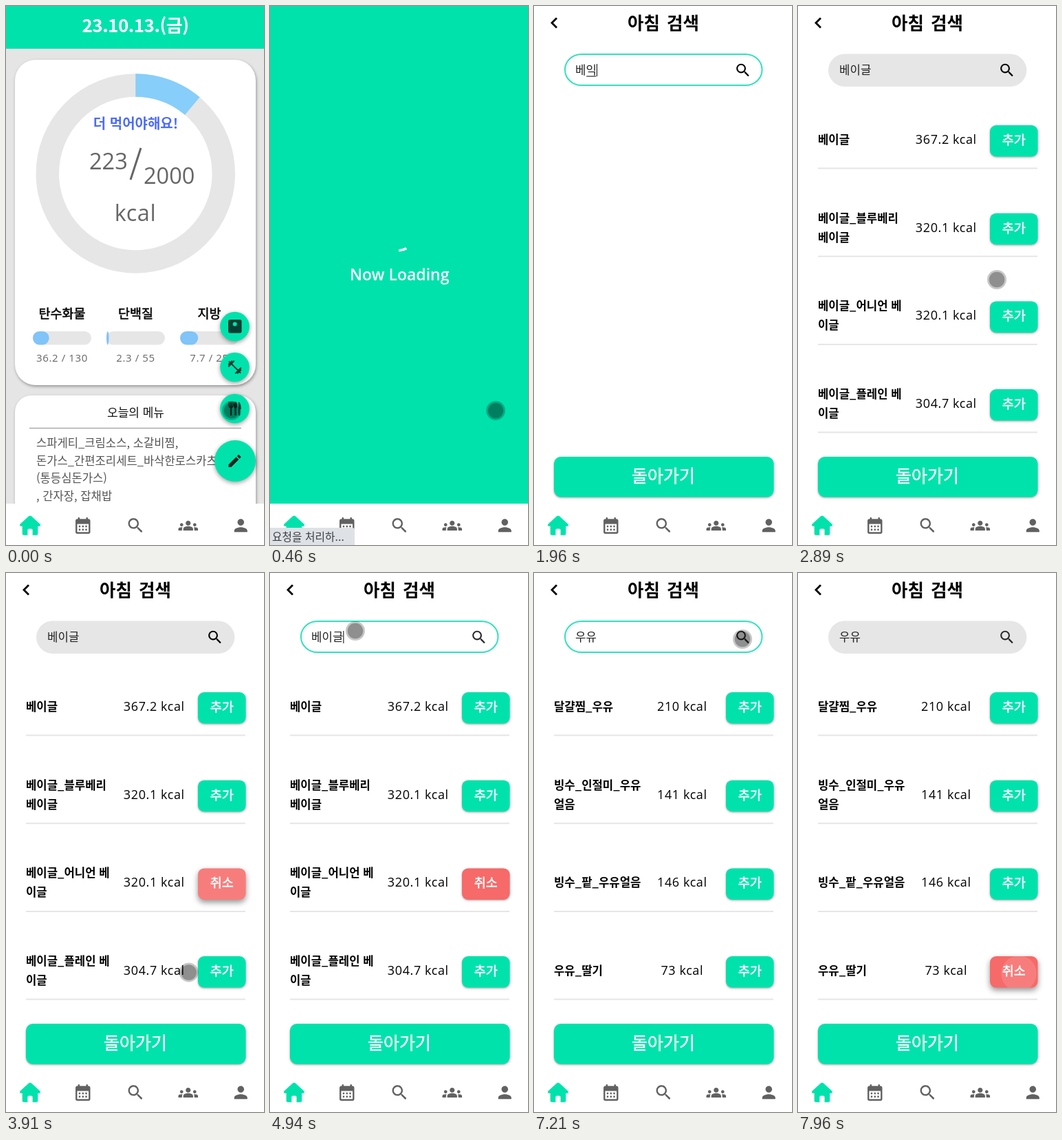
Animation, 375 px wide and 782 px high, one loop 8 s. Source, as an HTML page:

```html
<!DOCTYPE html>
<html lang="ko">
<head>
<meta charset="utf-8">
<title>Meal search</title>
<style>
  html, body { margin: 0; width: 100%; height: 100%; overflow: hidden; background: #fff; }
  svg { display: block; color: #000; }
  text { font-family: "Noto Sans CJK KR", "Noto Sans CJK", "Noto Sans", sans-serif; white-space: pre; }
  .latin { font-family: "Open Sans", "Noto Sans", sans-serif; }
  .mid { text-anchor: middle; }
  .green { fill: #00e2ac; }
  .grey { fill: #e6e6e6; }
  .blue { fill: #80c4f8; }
  .white { fill: #fff; color: #fff; }
  .soft { fill: #666; }
  .bold { font-weight: 700; }
  .semi { stroke: currentColor; stroke-width: .5px; }
  .card { fill: #fff; filter: drop-shadow(1px 2px 2px rgba(0,0,0,.35)); }
  .fab { fill: #00e2ac; filter: drop-shadow(0 2px 3px rgba(0,0,0,.38)); }
  .btn { filter: drop-shadow(0 1.5px 1px rgba(0,0,0,.24)) drop-shadow(0 1px 2px rgba(0,0,0,.14)); }
  .btn.down { filter: drop-shadow(0 4px 4px rgba(0,0,0,.42)); }
</style>
</head>
<body>
<svg id="stage" width="375" height="782" viewBox="0 0 375 782">
  <defs>
    <path id="search" d="M15.5 14h-.79l-.28-.27C15.41 12.59 16 11.11 16 9.5 16 5.91 13.09 3 9.5 3S3 5.91 3 9.5 5.91 16 9.5 16c1.61 0 3.09-.59 4.23-1.57l.27.28v.79l5 4.99L20.49 19l-4.99-5zm-6 0C7.01 14 5 11.99 5 9.5S7.01 5 9.5 5 14 7.01 14 9.5 11.99 14 9.5 14z"/>
    <path id="person" d="M12 12c2.21 0 4-1.79 4-4s-1.79-4-4-4-4 1.79-4 4 1.79 4 4 4zm0 2c-2.67 0-8 1.34-8 4v2h16v-2c0-2.66-5.33-4-8-4z"/>
    <path id="calendar" d="M19 4h-1V2h-2v2H8V2H6v2H5c-1.11 0-2 .9-2 2v14c0 1.1.89 2 2 2h14c1.1 0 2-.9 2-2V6c0-1.1-.9-2-2-2zm0 16H5V10h14v10zM9 14H7v-2h2v2zm4 0h-2v-2h2v2zm4 0h-2v-2h2v2zm-8 4H7v-2h2v2zm4 0h-2v-2h2v2zm4 0h-2v-2h2v2z"/>
    <path id="groups" d="M12 12.75c1.63 0 3.07.39 4.24.9 1.08.48 1.76 1.56 1.76 2.73V18H6v-1.61c0-1.18.68-2.26 1.76-2.73 1.17-.52 2.61-.91 4.24-.91zM4 13c1.1 0 2-.9 2-2s-.9-2-2-2-2 .9-2 2 .9 2 2 2zm1.13 1.1c-.37-.06-.74-.1-1.13-.1-.99 0-1.93.21-2.78.58C.48 14.9 0 15.62 0 16.43V18h4.5v-1.61c0-.83.23-1.61.63-2.29zM20 13c1.1 0 2-.9 2-2s-.9-2-2-2-2 .9-2 2 .9 2 2 2zm4 3.43c0-.81-.48-1.53-1.22-1.85-.85-.37-1.79-.58-2.78-.58-.39 0-.76.04-1.13.1.4.68.63 1.46.63 2.29V18H24v-1.57zM12 6c1.66 0 3 1.34 3 3s-1.34 3-3 3-3-1.34-3-3 1.34-3 3-3z"/>
    <path id="dumbbell" d="M20.57 14.86L22 13.43 20.57 12 17 15.57 8.43 7 12 3.43 10.57 2 9.14 3.43 7.71 2 5.57 4.14 4.14 2.71 2.71 4.14l1.43 1.43L2 7.71l1.43 1.43L2 10.57 3.43 12 7 8.43 15.57 17 12 20.57 13.43 22l1.43-1.43L16.29 22l2.14-2.14 1.43 1.43 1.43-1.43-1.43-1.43L22 16.29z"/>
    <path id="pencil" d="M3 17.25V21h3.75L17.81 9.94l-3.75-3.75L3 17.25zM20.71 7.04c.39-.39.39-1.02 0-1.41l-2.34-2.34c-.39-.39-1.02-.39-1.41 0l-1.83 1.83 3.75 3.75 1.83-1.83z"/>
  </defs>

  <g id="home">
    <rect width="375" height="782" fill="#e5e5e5"/>
    <rect class="green" width="375" height="62"/>
    <text class="mid white bold" x="188" y="38" font-size="26" letter-spacing="-.5">23.10.13.(금)</text>
    <rect class="card" x="13" y="78" width="350" height="472" rx="30"/>
    <g fill="none" stroke-width="33.5" transform="rotate(-90 188.3 243)">
      <circle cx="188.3" cy="243" r="128" stroke="#e6e6e6"/>
      <circle cx="188.3" cy="243" r="128" stroke="#87cefa" pathLength="2000" stroke-dasharray="223 2000"/>
    </g>
    <text class="mid bold" x="188.5" y="178" font-size="20" fill="#4c6cfb">더 먹어야해요!</text>
    <g class="soft" font-size="32.5">
      <text class="latin" x="121" y="237">223</text>
      <text class="latin" x="200" y="258">2000</text>
      <text class="latin mid" x="188" y="312" letter-spacing=".6">kcal</text>
    </g>
    <path d="M196 206L181 252" stroke="#666" stroke-width="3"/>
    <g id="macros"></g>
    <rect class="card" x="13" y="565" width="350" height="240" rx="24"/>
    <text class="mid" x="188.5" y="596" font-size="17" fill="#111">오늘의 메뉴</text>
    <path d="M34 612.5H342" stroke="#aaa" stroke-width="1.5"/>
    <g id="menu" font-size="16.6" fill="#555"></g>
    <circle class="fab" cx="332.5" cy="465" r="21.3"/>
    <circle class="fab" cx="332.5" cy="524" r="21.3"/>
    <circle class="fab" cx="332.5" cy="584" r="21.3"/>
    <circle class="fab" cx="333" cy="660" r="30"/>
    <g fill="#063f33">
      <rect x="323" y="455" width="19.5" height="19.5" rx="2.5"/>
      <circle class="green" cx="332.7" cy="461.5" r="3"/>
      <use href="#dumbbell" transform="translate(320.5 512)"/>
      <path d="M323.5 574v6q0 3 2.3 3.5V594h2.4V583.5q2.3-.5 2.3-3.5v-6h-1.5v6h-1v-6h-2v6h-1v-6z"/>
      <ellipse cx="333.5" cy="579" rx="2.6" ry="4.8"/>
      <rect x="332.4" y="582" width="2.2" height="12"/>
      <path d="M338 594v-20q4 2 3.5 11h-1.3v9z"/>
    </g>
    <use href="#pencil" transform="translate(320.5 648)" fill="#14251f"/>
  </g>

  <g id="loading">
    <rect class="green" width="375" height="722"/>
    <circle id="spin" cx="188.3" cy="336.5" r="18" fill="none" stroke="#fff" stroke-width="3.6" pathLength="126"/>
    <text class="mid white latin" x="188.3" y="398" font-size="23" font-weight="600">Now Loading</text>
  </g>

  <g id="finder">
    <rect class="white" width="375" height="782"/>
    <path d="M33 17.5L26 24.5L33 31.5" fill="none" stroke="#000" stroke-width="2.8"/>
    <text class="mid bold" x="188" y="34" font-size="25.5" word-spacing="3">아침 검색</text>
    <rect id="field" rx="24"/>
    <use id="lens" href="#search" transform="translate(291 80.5) scale(1.06)"/>
    <text id="query" x="60" y="98.5" font-size="16.8"></text>
    <rect id="under" y="101.5" width="14" height="1"/>
    <rect id="caret" y="84" width="1" height="18"/>
    <g id="listA"></g>
    <g id="listB"></g>
    <rect class="green btn" x="29" y="654" width="319.5" height="58.5" rx="10"/>
    <text class="mid white semi" x="188" y="691" font-size="25">돌아가기</text>
  </g>

  <g id="nav" fill="#616161">
    <rect class="white" y="722" width="375" height="60"/>
    <path class="green" d="M33 740.3q2-1.8 4 0l12.3 11.2q1.8 2.5-1 3.2h-2v10.5q0 2.5-2.5 2.5H38.600v-7.5q0-1.7-1.7-1.7h-3.8q-1.7 0-1.7 1.7v7.5H26.2q-2.5 0-2.5-2.5V754.7h-2q-2.8-.7-1-3.2z"/>
  </g>

  <g id="status">
    <path d="M0 757H120q3 0 3 3v22H0z" fill="#dee1e6"/>
    <text x="3" y="776" font-size="15.8" fill="#3c4043">요청을 처리하...</text>
  </g>

  <g id="touch">
    <circle r="14" fill="rgba(0,0,0,.22)"/>
    <circle r="11.3" fill="rgba(0,0,0,.28)"/>
  </g>
</svg>
<script>
const $ = id => document.getElementById(id);
const show = (el, on) => el.setAttribute('visibility', on ? 'visible' : 'hidden');
const attr = (el, map) => { for (const k in map) el.setAttribute(k, map[k]); };
const LOOP = 8000;
const GREEN = '#00e2ac', RED = '#f66a69';

// Static parts
[['탄수화물', 36.2, 130], ['단백질', 2.3, 55], ['지방', 7.7, 25]].forEach(([name, eaten, goal], i) => {
  const x = 39 + 107 * i, w = 85 * eaten / goal, mid = x + 42.5;
  $('macros').innerHTML += `
    <text class="mid semi" x="${mid}" y="453" font-size="18.5">${name}</text>
    <rect class="grey" x="${x}" y="472" width="85" height="19.5" rx="9.7"/>
    <rect class="blue" x="${x}" y="472" width="${w}" height="19.5" rx="${Math.min(9.7, w / 2)}" ry="9.7"/>
    <text class="mid soft latin" x="${mid}" y="516" font-size="15" letter-spacing=".6">${eaten} / ${goal}</text>`;
});

['스파게티_크림소스, 소갈비찜,', '돈가스_간편조리세트_바삭한로스카츠', '(통등심돈가스)', ', 간자장, 잡채밥']
  .forEach((line, i) => $('menu').innerHTML += `<text x="44" y="${640 + 25.6 * i}">${line}</text>`);

['calendar', 'search', 'groups', 'person'].forEach((icon, i) =>
  $('nav').innerHTML += `<use href="#${icon}" transform="translate(${97.5 + 76.5 * i} 739.5) scale(1.19)"/>`);

function buildList(root, foods) {
  foods.forEach(([name, kcal], i) => {
    const y = 194 + 127.7 * i, lines = name.split('|');
    const label = lines.map((s, k) =>
      `<text class="bold" x="29" y="${y + 6 + 28 * (k - (lines.length - 1) / 2)}" font-size="16.7">${s}</text>`).join('');
    root.innerHTML += `${label}
      <text class="mid latin" x="215.3" y="${y + 6}" font-size="18" letter-spacing=".6">${kcal} kcal</text>
      <g class="btn"><rect x="279" y="${y - 21}" width="69.5" height="45.5" rx="9" fill="${GREEN}"/></g>
      <text class="mid white semi act" x="313.7" y="${y + 7}" font-size="18.5">추가</text>
      <path d="M29 ${y + 41.5}H348" stroke="#e6e6e6" stroke-width="2"/>`;
  });
}
buildList($('listA'), [['베이글', 367.2], ['베이글_블루베리|베이글', 320.1], ['베이글_어니언 베|이글', 320.1], ['베이글_플레인 베|이글', 304.7]]);
buildList($('listB'), [['달걀찜_우유', 210], ['빙수_인절미_우유|얼음', 141], ['빙수_팥_우유얼음', 146], ['우유_딸기', 73]]);

// A list button that turns into "cancel", with a touch ripple
function toggler(list, row, press, x, y) {
  const btn = list.querySelectorAll('.btn')[row], box = btn.firstChild;
  const label = list.querySelectorAll('.act')[row];
  const id = list.id + 'clip';
  btn.insertAdjacentHTML('beforeend',
    `<clipPath id="${id}">${box.outerHTML}</clipPath><g clip-path="url(#${id})"><circle cx="${x}" cy="${y}" fill="#fff"/></g>`);
  const ripple = btn.querySelector('circle');
  return t => {
    const age = t - press, on = age >= 70;
    box.setAttribute('fill', on ? RED : GREEN);
    label.textContent = on ? '취소' : '추가';
    btn.classList.toggle('down', age >= 0 && age < 500);
    const grow = Math.min(1, Math.max(0, age / 550));
    attr(ripple, { r: age < 0 ? 0 : 8 + 36 * grow, opacity: .13 * Math.min(1, Math.max(0, (900 - age) / 350)) });
  };
}
const toggles = [toggler($('listA'), 2, 3430, 313, 450), toggler($('listB'), 3, 7690, 321, 581)];

// [time, text, composing]
const typing = [
  [0, ''], [1300, 'ㅂ', 1], [1430, '베', 1], [1690, '벵', 1], [1790, '베이', 1], [1890, '베익', 1],
  [1990, '베이그', 1], [2150, '베이글', 1], [2290, '베이글'], [5140, '베이'], [5340, '베'], [5410, ''],
  [5610, 'ㅇ', 1], [5680, '우', 1], [5750, '웅', 1], [5820, '우유', 1], [6040, '우유']
];

// Touch point strokes: each one is visible from its first to its last time
const strokes = [
  [[0, 328, 587], [690, 328, 587], [820, 190, 190], [890, 109, 79], [960, 109, 79], [1030, 104, 88], [1300, 104, 88]],
  [[2620, 104, 92], [2690, 303, 94], [2770, 303, 94], [2890, 289, 397], [2960, 289, 397], [3370, 312, 449],
   [3650, 312, 449], [3850, 290, 540], [4000, 230, 637], [4190, 204, 695], [4260, 204, 695], [4460, 228, 668],
   [4720, 228, 668], [4790, 190, 330], [4870, 128, 90], [4940, 124, 84], [5340, 124, 84]],
  [[6440, 110, 135], [6650, 164, 126], [6720, 164, 126], [6850, 341, 56], [7000, 303, 93], [7210, 303, 93],
   [7340, 304, 484], [7530, 304, 484], [7620, 321, 581], [7800, 321, 581], [7890, 180, 747]]
];

function touchAt(t) {
  const path = strokes.find(s => t >= s[0][0] && t < s[s.length - 1][0]);
  if (!path) return null;
  const i = path.findIndex(p => p[0] > t);
  const [t0, x0, y0] = path[i - 1], [t1, x1, y1] = path[i];
  const k = (t - t0) / (t1 - t0);
  return [x0 + (x1 - x0) * k, y0 + (y1 - y0) * k];
}

function drawField(t) {
  const focus = (t >= 1160 && t < 2760) || (t >= 4870 && t < 7300);
  const [, text, composing] = typing.filter(s => s[0] <= t).pop();
  const advance = 16.8 * .92, end = 60 + advance * text.length;
  attr($('field'), focus
    ? { x: 45, y: 70, width: 286.5, height: 45, fill: '#fff', stroke: '#30e2ba', 'stroke-width': 2 }
    : { x: 44, y: 69.5, width: 288.3, height: 47.5, fill: '#e6e6e6', stroke: 'none' });
  $('lens').setAttribute('fill', t < 4870 ? '#000' : '#2a2a2a');
  $('query').textContent = text || '음식 검색';
  $('query').setAttribute('fill', text ? '#222' : '#a0a0a0');
  $('under').setAttribute('x', end - advance + .8);
  $('caret').setAttribute('x', end);
  show($('under'), composing);
  show($('caret'), focus && (composing || t < 1300 || (t > 4800 && t < 5820)));
}

function drawSpinner(t) {
  const age = Math.max(0, t - 260), p = Math.min(1, age / 700) ** 1.7;
  attr($('spin'), {
    'stroke-dasharray': `${1 + 99 * p} 200`,
    'stroke-dashoffset': -15 * p,
    transform: `rotate(${age / 1400 * 360} 188.3 336.5)`
  });
}

function draw(t) {
  const loading = t >= 260 && t < 690;
  show($('home'), t < 260);
  show($('loading'), loading);
  show($('status'), loading);
  $('finder').style.display = t >= 690 ? '' : 'none';
  $('listA').style.display = t >= 2760 && t < 7100 ? '' : 'none';
  $('listB').style.display = t >= 7100 ? '' : 'none';
  drawSpinner(t);
  drawField(t);
  toggles.forEach(f => f(t));
  const p = touchAt(t);
  show($('touch'), p);
  if (p) $('touch').setAttribute('transform', `translate(${p})`);
}

const start = performance.now();
function tick() {
  draw((performance.now() - start) % LOOP);
  requestAnimationFrame(tick);
}
tick();
</script>
</body>
</html>
```
